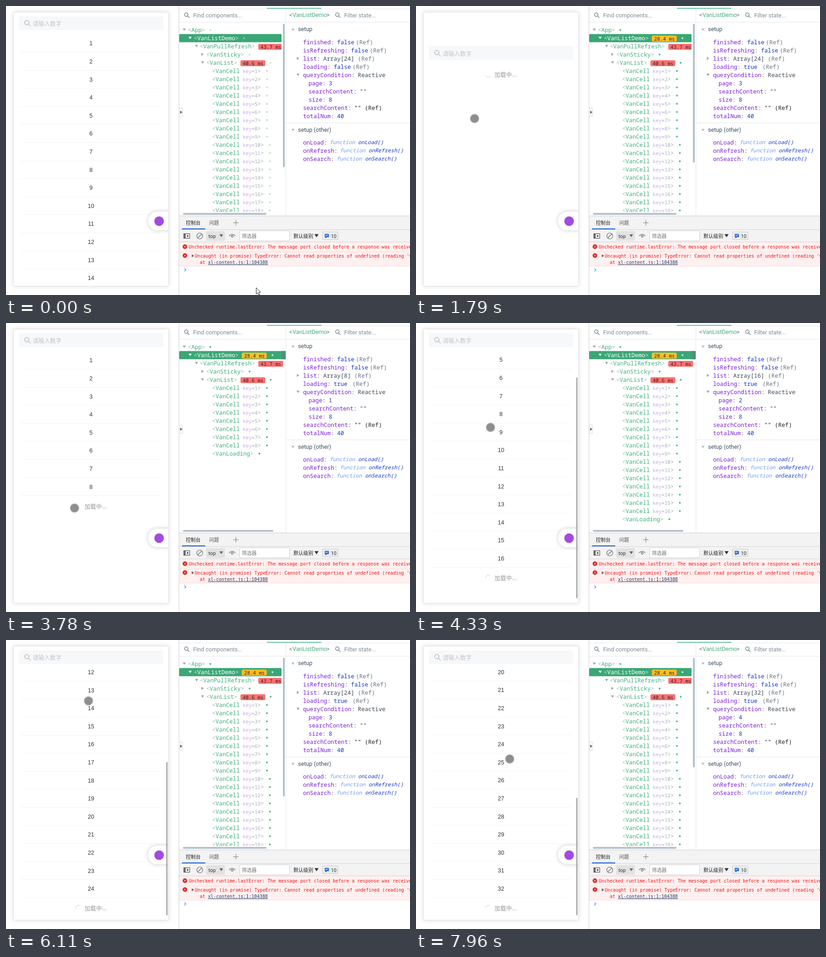
Animation, 884 px wide and 634 px high, one loop 8 s. Source, as an HTML page with a canvas:

```html
<!DOCTYPE html>
<html lang="zh">
<head>
<meta charset="utf-8">
<style>
html, body { margin: 0; width: 884px; height: 634px; overflow: hidden; background: #fff; }
canvas { display: block; }
</style>
</head>
<body>
<canvas id="stage" width="884" height="634"></canvas>
<script>
const ctx = document.getElementById('stage').getContext('2d');
const LOOP = 8000, ROW = 39.6, CH = 7.56;
const CJK = '"Noto Sans CJK SC", "Noto Sans CJK", sans-serif';
const MONO = '12.6px "Roboto Mono", "Noto Sans Mono", monospace';
const SMALL = '10.8px "Roboto Mono", "Noto Sans Mono", monospace';
const ITALIC = 'italic 11.6px "Roboto Mono", "Noto Sans Mono", monospace';
const UI = '12.6px Roboto, sans-serif';
const LOG = '9.9px "DejaVu Sans Mono", monospace';
const ARIAL = '12.6px "Liberation Sans", sans-serif';
const ZH = '12.6px ' + CJK, ZH_SMALL = '10.8px ' + CJK;
const GREEN = '#42b983', PURPLE = '#7a1fd1', BLUE = '#1637c4', GRAY = '#969799', INK = '#30363d';

// [time, values...]
const pointer = [
  [0, 547, 618], [70, 545, 612], [820, 125, 138], [980, 125, 138], [1650, 128, 245],
  [1760, 128, 246], [2400, 150, 380], [2900, 153, 388], [3310, 149, 406], [3780, 150, 406],
  [4250, 163, 229], [4400, 163, 229], [4900, 223, 449], [5280, 223, 449], [5650, 180, 130],
  [6000, 180, 130], [7060, 197, 246], [7220, 212, 430], [7520, 205, 261], [8000, 205, 261]];
const pulling = [[0, 0], [1000, 0], [1600, 71], [1740, 71], [2040, 0], [8000, 0]];
const scrolling = [
  [0, 0], [3830, 0], [4230, 159.4], [4340, 159.4], [4600, 130], [4930, 126.8], [5290, 126.8],
  [5750, 446.9], [6960, 446.9], [6980, 443.6], [7220, 443.6], [7620, 764], [8000, 764]];
const counts = [[0, 24], [1740, 0], [2790, 8], [3800, 16], [4940, 24], [6970, 32]];
const loadSpans = [[1740, 4960], [5960, 6970], [7640, 8000]];
const barSpans = [[3840, 4900], [5300, 6500], [7230, 8000]];

const within = (spans, t) => spans.some(([a, b]) => t >= a && t < b);
const latest = (steps, t) => steps.filter(s => s[0] <= t).pop()[1];

function tween(keys, t) {
  const i = keys.findIndex(k => k[0] > t), a = keys[i - 1], b = keys[i];
  const p = (t - a[0]) / (b[0] - a[0]), e = p * p * (3 - 2 * p);
  return a.slice(1).map((v, j) => v + (b[j + 1] - v) * e);
}

function rect(x, y, w, h, color, r = 0) {
  ctx.fillStyle = color;
  ctx.beginPath();
  ctx.roundRect(x, y, w, h, r);
  ctx.fill();
}

function line(points, color, width = 1) {
  ctx.strokeStyle = color;
  ctx.lineWidth = width;
  ctx.beginPath();
  points.forEach(([x, y]) => ctx.lineTo(x, y));
  ctx.stroke();
}

function disc(x, y, r, fill, stroke, width = 1) {
  ctx.beginPath();
  ctx.arc(x, y, r, 0, 7);
  if (fill) { ctx.fillStyle = fill; ctx.fill(); }
  if (stroke) { ctx.strokeStyle = stroke; ctx.lineWidth = width; ctx.stroke(); }
}

// y is the middle of the line of text
function text(s, x, y, color = INK, font = MONO, align = 'left') {
  const drop = font === MONO || font === ZH ? 5 : 4.3;
  ctx.font = font;
  ctx.fillStyle = color;
  ctx.textAlign = align;
  ctx.fillText(s, x, Math.round(y + drop));
}

function clip(x, y, w, h, draw) {
  ctx.save();
  ctx.beginPath();
  ctx.rect(x, y, w, h);
  ctx.clip();
  draw();
  ctx.restore();
}

function triangle(x, y, color, right, r = 3.5) {
  ctx.fillStyle = color;
  ctx.beginPath();
  if (right) { ctx.moveTo(x - r + 1, y - r); ctx.lineTo(x + r - 1, y); ctx.lineTo(x - r + 1, y + r); }
  else { ctx.moveTo(x - r, y - r + 1); ctx.lineTo(x + r, y - r + 1); ctx.lineTo(x, y + r - 1); }
  ctx.fill();
}

function lens(x, y, r, color, width = 1.3) {
  disc(x, y, r, null, color, width);
  line([[x + r * .7, y + r * .7], [x + r * 1.8, y + r * 1.8]], color, width);
}

function spinner(x, y, t) {
  const turn = t / 1815 * 2 * Math.PI + .7;
  ctx.strokeStyle = '#b9cdc2';
  ctx.lineWidth = .9;
  ctx.beginPath();
  ctx.arc(x, y, 6, turn, turn + 2.2);
  ctx.stroke();
}

function phone(t, count, loading, pull, scroll) {
  ctx.save();
  ctx.shadowColor = 'rgba(0,0,0,.13)';
  ctx.shadowBlur = 10;
  rect(16, 13, 340, 602, '#e4e4e4');
  ctx.restore();
  rect(17, 14, 338, 600, '#fff');
  clip(17, 14, 338, 600, () => {
    for (let i = 0; i < count; i++) {
      const y = 82 + ROW * i - scroll + pull;
      if (y < 30 || y > 650) continue;
      text(i + 1, 186, y, '#323233', ARIAL, 'center');
      rect(32, Math.round(y + 19), 308, 1, '#f4f5f6');
    }
    if (loading) {
      const y = 84.8 + ROW * count - scroll + pull;
      spinner(158.5, y, t);
      text('加载中...', 172, y, GRAY, ZH);
    }
    rect(17, 14, 338, 48 + pull, '#fff');
    if (pull && t < 1740) {
      text(pull < 45 ? '下拉即可刷新...' : '释放即可刷新...', 186, pull - 9.5, GRAY, ZH, 'center');
    }
    rect(28, 23 + pull, 316, 30, '#f7f8fa', 2);
    lens(45.5, 36.5 + pull, 4.8, '#8f9196', 1);
    text('请输入数字', 58.5, 38 + pull, '#c2c4c8', ZH);

    ctx.save();
    ctx.shadowColor = 'rgba(0,0,0,.22)';
    ctx.shadowBlur = 8;
    rect(311, 451, 60, 41, '#fff', 20);
    ctx.restore();
    disc(335, 472, 10.5, '#a24be0');

    if (within(barSpans, t)) {
      const view = 591, max = 130 + ROW * (count - 16), size = view * view / (view + max);
      const top = 13 + (view - size) * Math.min(scroll / max, 1);
      rect(350.5, top, 3, size, '#a9a9a9', 1.5);
    }
  });
}

function badge(s, x, y, color) {
  rect(x, y - 5, 54.5, 13, color, 3);
  text(s, x + 5, y + 1.5, '#3a1d1d', SMALL);
}

function tag(name, x, y, close = true, selected = false) {
  const edge = selected ? '#d5f0e3' : '#a5b0ba';
  text('<', x, y, edge);
  text(name, x + CH, y, selected ? '#fff' : '#3fae7b');
  if (close) text('>', x + CH * (name.length + 1), y, edge);
}

function tree(count, loading, active) {
  const rows = 5 + count + (loading ? 1 : 0), tall = rows > 22, right = tall ? 603 : 612;
  const dotColor = active ? GREEN : '#bfe0d0', activeDot = active ? '#d0f5e2' : '#8ccbad';
  const dot = (x, y) => disc(x, y + .5, 1.9, y === 70 ? activeDot : dotColor);
  clip(379, 37, right - 379, 415, () => {
    rect(379, 61.5, right - 379, 18, '#3ba776', 2);
    rect(603, 61.5, 9, 18, '#4f917a');
    triangle(390, 52, '#9aa5ae');
    tag('App', 398, 52);
    dot(447, 52);
    triangle(403, 70, '#fff');
    tag('VanListDemo', 411, 70, true, true);
    if (active) badge('28.4 ms', 516, 70, '#fbbf24');
    dot(active ? 583 : 521, 70);
    triangle(417, 88, '#9aa5ae');
    tag('VanPullRefresh', 424, 88);
    badge('43.7 ms', 552, 88, '#f87171');
    triangle(430, 106, '#9aa5ae', true);
    tag('VanSticky', 438, 106);
    dot(533, 106);
    triangle(430, 124, '#9aa5ae');
    tag('VanList', 438, 124);
    badge('40.6 ms', 513, 124, '#f87171');
    dot(579, 124);
    for (let i = 0; i < Math.min(count, 18); i++) {
      const y = 142 + 18 * i, key = '=' + (i + 1), end = 537.4 + key.length * 6.48;
      tag('VanCell', 451, y, false);
      text('key', 518, y + .5, '#cda4ee', SMALL);
      text(key, 537.4, y + .5, '#a5adb5', SMALL);
      text('>', end, y, '#a5b0ba');
      dot(end + 20.5, y);
    }
    if (loading && count < 18) {
      const y = 142 + 18 * count;
      tag('VanLoading', 451, y);
      dot(554.5, y);
    }
  });
  if (tall) rect(606, 39, 4, 164750 / (18 * rows + 1), '#b3c0cb', 2);
  rect(387, 454, tall ? 183 : 198, 4, '#b3c0cb', 2);
}

function field(key, x, y, value, color = BLUE, gap = 14) {
  const end = x + key.length * CH;
  text(key, x, y, PURPLE);
  text(':', end, y, '#555');
  text(value, end + gap, y, color);
  return end + gap;
}

function flag(key, y, on) {
  const x = field(key, 650, y, String(on));
  text('(Ref)', x + 41, y, '#6a7681');
}

function inspector(count, loading) {
  triangle(628, 52, '#b5bcc3');
  text('setup', 639, 51, '#3d4f5f', UI);
  flag('finished', 79, false);
  flag('isRefreshing', 97, false);
  triangle(639, 115, '#9aa5ae', true);
  const x = field('list', 650, 115, `Array[${count}]`, '#3d4852');
  text('(Ref)', x + CH * (count > 9 ? 10 : 9), 115, '#6a7681');
  flag('loading', 133, loading);
  triangle(639, 151, '#9aa5ae');
  field('queryCondition', 650, 151, 'Reactive', '#3d4852');
  field('page', 662, 169, Math.max(1, count / 8));
  field('searchContent', 662, 187, '""', '#3d4852');
  field('size', 662, 205, 8);
  field('searchContent', 650, 223, '"" (Ref)', '#222');
  field('totalNum', 650, 241, 40);
  rect(613, 256, 271, 1, '#e3e6e9');
  triangle(628, 272, '#b5bcc3');
  text('setup (other)', 639, 272, '#3d4f5f', UI);
  ['onLoad', 'onRefresh', 'onSearch'].forEach((name, i) => {
    const y = 299 + 18 * i, start = field(name, 650, y, '', BLUE, 12.6);
    text('function', start, y, '#6f9bf0', ITALIC);
    text(name + '()', start + 62.6, y, BLUE, ITALIC);
  });
}

function toolsHeader() {
  rect(378, 0, 1, 634, '#cdcdcd');
  rect(379, 6, 505, 1, '#e3e6e9');
  rect(571, 4, 119, 2, '#6ecba2');
  rect(379, 35, 505, 1, '#e3e6e9');
  rect(612, 7, 1, 453, '#e3e6e9');
  lens(394.5, 19, 3.8, '#5f7487');
  text('Find components...', 409.5, 21, '#7c8b98', UI);
  text('<', 620, 20, '#627487', UI);
  text('VanListDemo', 627, 20, '#3fae7b', UI);
  text('>', 701.5, 20, '#627487', UI);
  lens(725, 19, 3.8, '#5f7487');
  text('Filter state...', 740, 21, '#7c8b98', UI);
  rect(379, 223, 8, 20, '#e0e0e0', 2);
  rect(379, 224, 7, 18, '#fafafa', 2);
  triangle(383.5, 233, '#666', true);
}

function errorMark(y) {
  disc(391.5, y, 5, '#dd2222');
  line([[389.7, y - 1.8], [393.3, y + 1.8]], '#fff');
  line([[393.3, y - 1.8], [389.7, y + 1.8]], '#fff');
}

function consolePanel() {
  rect(379, 460, 505, 58, '#f3f3f3');
  rect(379, 460, 505, 1, '#cdcdcd');
  rect(379, 490, 505, 1, '#d4d4d4');
  rect(379, 517, 505, 1, '#d4d4d4');
  rect(385, 488, 51, 2, '#1a5fd0');
  text('控制台', 393.5, 476, '#222', ZH_SMALL);
  text('问题', 444.5, 476, '#555', ZH_SMALL);
  line([[497, 475.5], [509, 475.5]], '#777');
  line([[503, 469.5], [503, 481.5]], '#777');

  ctx.strokeStyle = '#555';
  ctx.lineWidth = 1.2;
  ctx.strokeRect(389, 499.5, 13, 10);
  rect(389, 499.5, 4, 10, '#666');
  triangle(398, 504.5, '#555', true, 3);
  disc(424, 504.5, 6.5, null, '#666', 1.2);
  line([[419.5, 509], [428.5, 500]], '#666', 1.2);
  rect(438, 494, 41, 21, '#e2e2e2', 2);
  text('top', 443, 504.5, '#333', '11px Roboto, sans-serif');
  triangle(471, 504, '#666', false, 4);
  ctx.strokeStyle = '#666';
  ctx.beginPath();
  ctx.ellipse(495, 505, 6.5, 4, 0, Math.PI, 2 * Math.PI);
  ctx.stroke();
  disc(495, 505, 2.2, null, '#666', 1.2);
  rect(511, 492.5, 110, 23, '#d2d2d2', 2);
  rect(512, 493.5, 108, 21, '#fff', 1);
  text('筛选器', 516, 504.5, '#777', ZH_SMALL);
  text('默认级别', 629, 504.5, '#222', ZH_SMALL);
  triangle(679.5, 504, '#333', false, 4.5);
  rect(692, 495, 35, 18, '#cfcfcf', 2);
  rect(693, 496, 33, 16, '#ececec', 2);
  rect(697.5, 500, 9, 7, '#1a5fd0', 1);
  triangle(700, 508, '#1a5fd0', false, 2.5);
  rect(699, 502, 6, 1, '#fff');
  rect(699, 504, 4, 1, '#fff');
  text('10', 711, 504.5, '#333', '10.8px Roboto, sans-serif');

  rect(379, 518, 505, 52, '#fff0f0');
  rect(379, 539, 505, 1, '#ffd7d7');
  rect(379, 570, 505, 1, '#ffd7d7');
  errorMark(528);
  errorMark(547.5);
  const red = '#ee1111';
  text('Unchecked runtime.lastError: The message port closed before a response was received.', 400, 528, red, LOG);
  triangle(409, 548, '#666', true);
  text("Uncaught (in promise) TypeError: Cannot read properties of undefined (reading 'w", 413, 548, red, LOG);
  text('at', 424, 561.5, red, LOG);
  text('xl-content.js:1:104388', 442, 561.5, '#243a66', LOG);
  rect(442, 567, 131, 1, '#243a66');
  line([[390.5, 576], [393.5, 579], [390.5, 582]], '#3b82f6', 1.2);
}

function drawPointer(x, y) {
  if (x < 378) return disc(x, y, 9.4, 'rgba(122,122,122,.85)', '#b8b2b2', 1.5);
  ctx.save();
  ctx.translate(x, y);
  ctx.beginPath();
  [[.5, 0], [.5, 14], [3.7, 11], [6, 16], [8.3, 15], [6, 10.2], [10.3, 10]].forEach(p => ctx.lineTo(...p));
  ctx.closePath();
  ctx.fillStyle = '#fff';
  ctx.fill();
  ctx.strokeStyle = '#222';
  ctx.lineWidth = 1;
  ctx.stroke();
  ctx.restore();
}

function draw(t) {
  const count = latest(counts, t), loading = within(loadSpans, t);
  // the inspector follows the list a moment later
  const shown = latest(counts, Math.max(0, t - 60));
  const shownLoading = within(loadSpans, t - 40);
  rect(0, 0, 884, 634, '#fff');
  phone(t, count, loading, tween(pulling, t)[0], tween(scrolling, t)[0]);
  toolsHeader();
  tree(shown, shownLoading, t > 1060);
  inspector(shown, shownLoading);
  consolePanel();
  drawPointer(...tween(pointer, t));
}

const start = performance.now();
function frame() {
  draw((performance.now() - start) % LOOP);
  requestAnimationFrame(frame);
}
frame();
</script>
</body>
</html>
```
